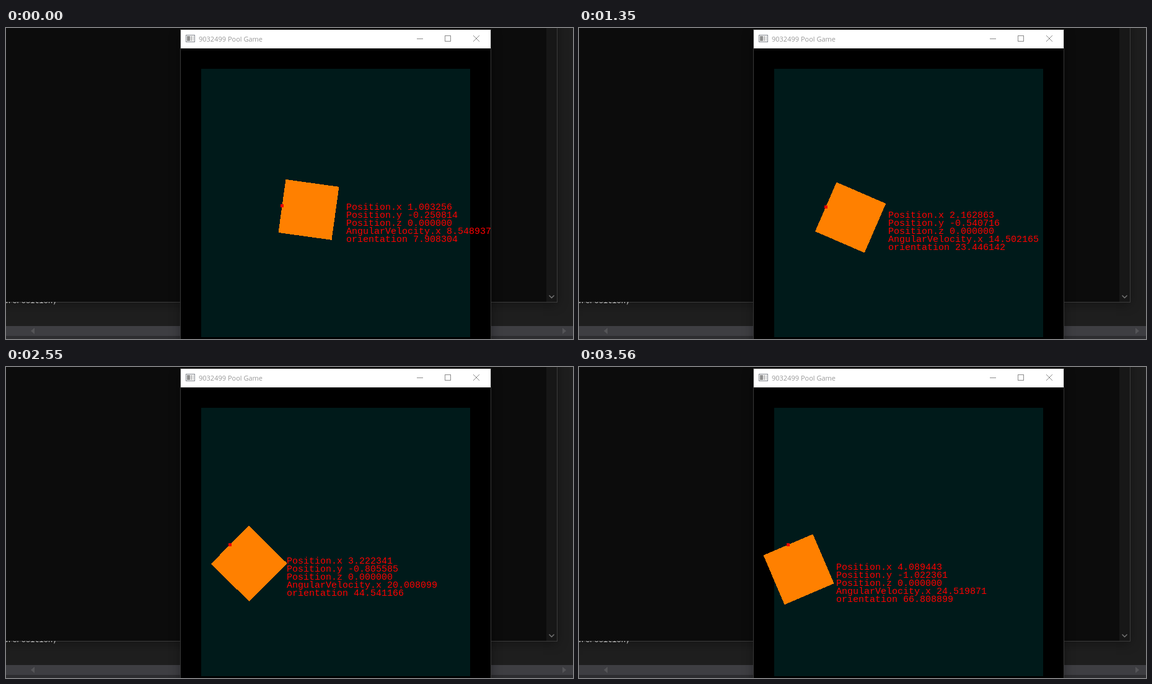
Recreate the animation shown at these times as an HTML page with a canvas. Size 915 by 503 pixels, loop 3.62 s.

```html
<!DOCTYPE html>
<html lang="en">
<head>
<meta charset="utf-8">
<title>Pool Game</title>
<style>
  html, body { margin: 0; width: 100%; height: 100%; overflow: hidden; background: #1e1e1e; }
  canvas { display: block; }
</style>
</head>
<body>
<canvas id="stage" width="915" height="503"></canvas>
<script>
const ctx = document.getElementById('stage').getContext('2d');
const LOOP = 3620;
const STEP = 67.038;
const UNIT = 43.4;
const ORIGIN = { x: 532, y: 283 };

// Simulation samples: step, position x, angular velocity, orientation in degrees
const SAMPLES = [
  [0, 1.003256, 8.548937, 7.908304],
  [12, 1.703068, 12.122911, 16.364754],
  [20, 2.162863, 14.502165, 23.446142],
  [26, 2.522744, 16.369314, 29.860260],
  [33, 2.932353, 18.499636, 38.100559],
  [42, 3.454332, 21.214870, 50.056961],
  [53, 4.089443, 24.519871, 66.808899]
];

const lerp = (a, b, f) => a + (b - a) * f;

function rect(color, x, y, w, h) {
  ctx.fillStyle = color;
  ctx.fillRect(x, y, w, h);
}

function shadowRect(color, x, y, w, h) {
  ctx.save();
  ctx.shadowColor = 'rgba(0, 0, 0, 0.35)';
  ctx.shadowBlur = 16;
  ctx.shadowOffsetY = 3;
  rect(color, x, y, w, h);
  ctx.restore();
}

function polygon(color, points) {
  ctx.fillStyle = color;
  ctx.beginPath();
  points.forEach(([x, y]) => ctx.lineTo(x, y));
  ctx.fill();
}

// Fills a convex polygon row by row, with hard pixel edges
function crispPolygon(color, points) {
  const ys = points.map(p => p[1]);
  for (let row = Math.floor(Math.min(...ys)); row < Math.max(...ys); row++) {
    const mid = row + 0.5;
    const hits = [];
    points.forEach(([x0, y0], i) => {
      const [x1, y1] = points[(i + 1) % points.length];
      if ((y0 <= mid) !== (y1 <= mid)) hits.push(lerp(x0, x1, (mid - y0) / (y1 - y0)));
    });
    if (hits.length < 2) continue;
    const left = Math.round(Math.min(...hits));
    rect(color, left, row, Math.round(Math.max(...hits)) - left, 1);
  }
}

function line(color, width, points) {
  ctx.strokeStyle = color;
  ctx.lineWidth = width;
  ctx.beginPath();
  points.forEach(([x, y]) => ctx.lineTo(x, y));
  ctx.stroke();
}

function text(str, x, y, color, font) {
  ctx.fillStyle = color;
  ctx.font = font;
  ctx.fillText(str, x, y);
}

function clipped(x, y, w, h, draw) {
  ctx.save();
  ctx.beginPath();
  ctx.rect(x, y, w, h);
  ctx.clip();
  draw();
  ctx.restore();
}

function stateAt(step) {
  let i = 0;
  while (i < SAMPLES.length - 2 && step >= SAMPLES[i + 1][0]) i++;
  const [s0, x0, w0, a0] = SAMPLES[i];
  const [s1, x1, w1, a1] = SAMPLES[i + 1];
  const f = (step - s0) / (s1 - s0);
  const spin = lerp(w0, w1, f);
  // Constant acceleration: the angle grows with the square of the spin
  const turn = (spin * spin - w0 * w0) / (w1 * w1 - w0 * w0);
  const x = lerp(x0, x1, f);
  return { x, y: -x / 4, spin, angle: lerp(a0, a1, turn) };
}

function drawDesktop() {
  rect('#1e1e1e', 0, 0, 915, 503);
  rect('#3e3e42', 0, 482, 915, 16);
  rect('#2d2d30', 0, 498, 915, 5);
  polygon('#555558', [[40, 490], [46, 485], [46, 495]]);
  polygon('#555558', [[904, 490], [898, 485], [898, 495]]);

  shadowRect('#3c3c3c', -20, -20, 910, 464);
  rect('#0c0c0c', 0, 0, 872, 443);
  rect('#171717', 872, 0, 17, 443);
  line('#757575', 1.5, [[876.5, 432.5], [880.5, 436.5], [884.5, 432.5]]);
  clipped(0, 443, 90, 8, () =>
    text('urePosition;', -4, 445, '#c8c8c8', '12px "Liberation Mono", monospace'));
}

function drawWindow() {
  shadowRect('#383838', 281, 2, 502, 521);
  rect('#ffffff', 282, 3, 500, 30);
  rect('#000000', 282, 33, 500, 470);
  rect('#001a1a', 315, 66, 434, 434);

  rect('#858990', 290, 11, 15, 12);
  rect('#ffffff', 291, 12, 13, 10);
  rect('#8f8f8f', 292, 13, 5, 8);
  rect('#b8b8b8', 298, 13, 2, 8);
  rect('#d4d4d4', 301, 13, 2, 8);

  text('9032499 Pool Game', 311, 22, '#999999', '11px "Open Sans", "Noto Sans", sans-serif');
  const gray = '#8c8c8c';
  rect(gray, 663, 17, 10, 1);
  ctx.strokeStyle = gray;
  ctx.lineWidth = 1;
  ctx.strokeRect(708.5, 12.5, 9, 9);
  line(gray, 1, [[754, 12], [764, 22]]);
  line(gray, 1, [[764, 12], [754, 22]]);
}

function drawBox({ x, y, spin, angle }) {
  const cx = ORIGIN.x - UNIT * x;
  const cy = ORIGIN.y - UNIT * y;
  const rad = angle * Math.PI / 180;
  const c = UNIT * Math.cos(rad);
  const s = UNIT * Math.sin(rad);
  const place = (u, v) => [cx + u * c - v * s, cy + u * s + v * c];

  crispPolygon('#ff8000', [place(-1, -1), place(1, -1), place(1, 1), place(-1, 1)]);
  const [dotX, dotY] = place(-1, 0);
  rect('#f00000', Math.round(dotX - 2.5), Math.round(dotY - 2.5), 5, 5);

  const labels = [
    'Position.x ' + x.toFixed(6),
    'Position.y ' + y.toFixed(6),
    'Position.z 0.000000',
    'AngularVelocity.x ' + spin.toFixed(6),
    'orientation ' + angle.toFixed(6)
  ];
  const left = Math.ceil(cx + 60);
  const base = Math.ceil(cy);
  labels.forEach((label, i) =>
    text(label, left, base + 13 * i, '#ff0000', '15px "Liberation Mono", monospace'));
}

function render() {
  const time = performance.now() % LOOP;
  const step = Math.floor(Math.floor(time / 10) * 10 / STEP);
  drawDesktop();
  drawWindow();
  clipped(282, 33, 500, 470, () => drawBox(stateAt(step)));
  requestAnimationFrame(render);
}

render();
</script>
</body>
</html>
```
